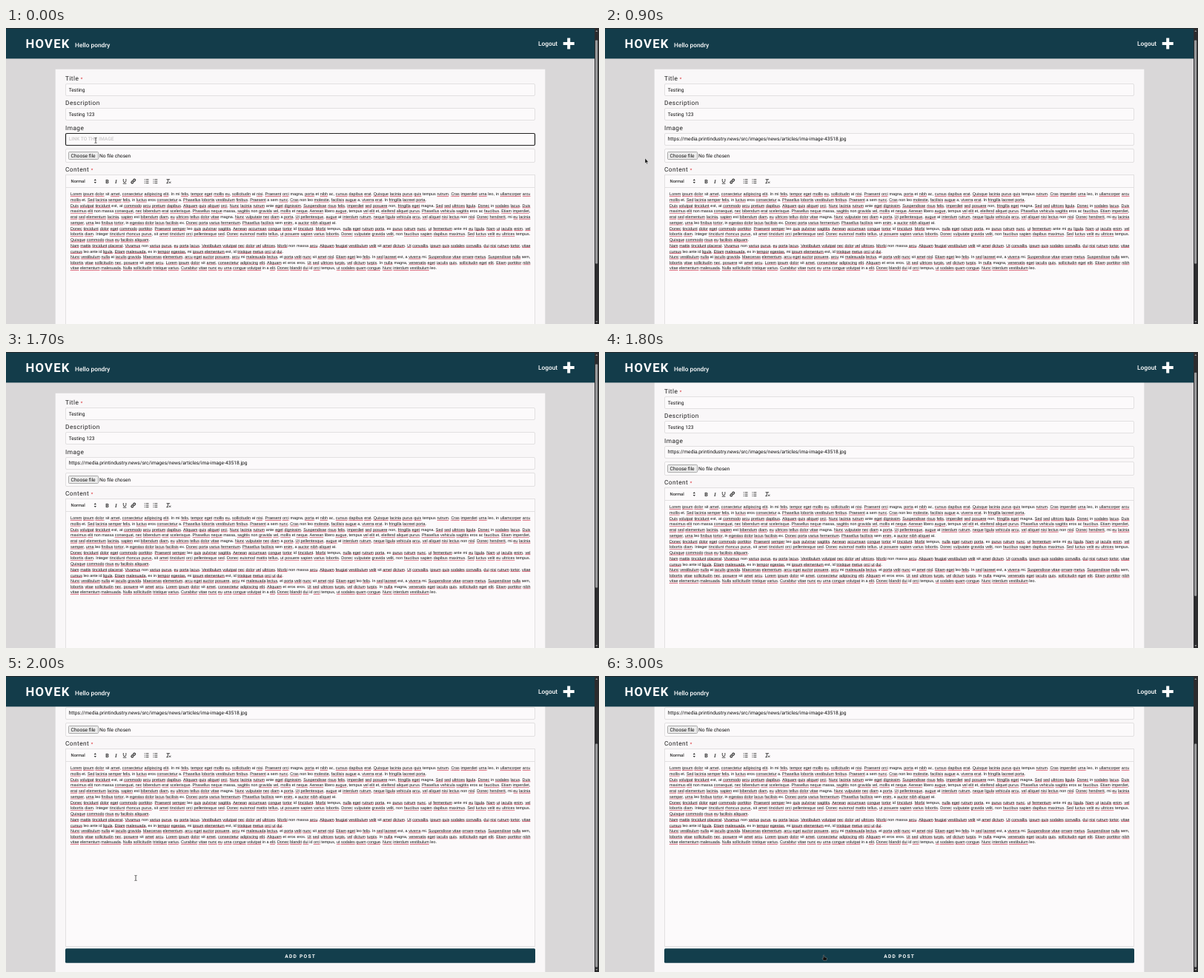
These frames come from a looping animation (800 px wide and 400 px high, 3100 ms). An HTML page:

```html
<!DOCTYPE html>
<html lang="en">
<head>
<meta charset="utf-8">
<title>Add post</title>
<style>
html, body { margin: 0; width: 100%; height: 100%; overflow: hidden; }
body { background: #d9d7d8; font-family: Roboto, sans-serif; text-rendering: geometricPrecision; }
#stage { position: relative; width: 800px; height: 400px; overflow: hidden; }
svg, #page, #copy { position: absolute; left: 0; top: 0; }
svg text { white-space: pre; }
/* The editor text is laid out at full size and shown at 800 / 1920. */
#copy { left: 86.5px; top: 221px; width: 1489px; color: #111; font: 13px/18.46px "Liberation Sans", Arial, sans-serif; transform: scale(.41667); transform-origin: 0 0; }
#copy div { height: 18.46px; white-space: nowrap; }
#copy .full { text-align: justify; text-align-last: justify; }
#copy span { padding-bottom: 1px; background: repeating-linear-gradient(90deg, #cf4a60 0 2.4px, #e59aa6 2.4px 4.8px) 0 100% / 100% 2.6px no-repeat; }
.label { font-size: 8.333px; letter-spacing: .417px; fill: #222; }
.value { font-size: 6.667px; fill: #111; }
.star { fill: #d8262c; font-size: 6px; }
.box { fill: #fcfafb; stroke: #e2e0e1; }
.icon { fill: none; stroke: #333; stroke-width: .9; }
.bold { font-weight: 700; }
.mid { font-weight: 500; }
</style>
</head>
<body>
<div id="stage">
  <div id="page">
    <svg width="800" height="520">
      <rect x="66.7" y="55.8" width="660.6" height="464" fill="#f9f7f8"/>
      <g class="label">
        <text x="80" y="71.2">Title <tspan class="star">*</tspan></text>
        <text x="80" y="104.4">Description</text>
        <text x="80" y="137.7">Image</text>
        <text x="80" y="194.3">Content <tspan class="star">*</tspan></text>
      </g>
      <g class="box">
        <rect x="80.5" y="75.5" width="633" height="16" rx="1.5"/>
        <rect x="80.5" y="108.5" width="633" height="16" rx="1.5"/>
        <rect id="link" x="80.5" y="142.5" width="633" height="16" rx="1.5"/>
        <rect x="80.5" y="163.5" width="633" height="18" rx="1.5"/>
        <rect x="80.5" y="198.5" width="633" height="267"/>
        <path d="M80 215.5H714"/>
      </g>
      <g class="value">
        <text x="84.7" y="86">Testing</text>
        <text x="84.7" y="119.2">Testing 123</text>
        <text id="hint" class="bold" x="84.7" y="152.4" fill="#d0cecf">LINK TO THE IMAGE</text>
        <text id="url" x="84.7" y="152.4">https://media.printindustry.news/src/images/news/articles/ima-image-43518.jpg</text>
        <rect x="84.5" y="167.5" width="40" height="10" rx="1" fill="#ececec" stroke="#8a8a8a" stroke-width=".7"/>
        <text x="87.6" y="174.8">Choose file</text>
        <text x="126" y="174.8">No file chosen</text>
      </g>
      <g fill="#333" font-size="5.833">
        <text class="mid" x="87.5" y="209.2">Normal</text>
        <path d="M118.7 206.3l1.6-2.2 1.6 2.2zM118.7 207.9l1.6 2.2 1.6-2.2z"/>
        <text class="bold" x="134.2" y="209.8" font-size="7.2">B</text>
        <text class="bold" x="147" y="209.8" font-size="7.2" font-style="italic" font-family="Liberation Serif, serif">I</text>
      </g>
      <g class="icon">
        <path d="M158.3 204v2.6q0 2 1.8 2t1.8-2V204M157.8 210.2h4.6"/>
        <path stroke-width="1.2" d="M170.9 207.9l1.6-1.7M170.8 206.1l-1.5 1.5a1.3 1.3 0 0 0 1.9 1.9l1.1-1.1M171.2 205.7l1.1-1.2a1.3 1.3 0 0 1 1.9 1.9l-1.5 1.5"/>
        <path d="M188.7 204.8h3.8m-3.8 2.4h3.8m-3.8 2.4h3.8M186.7 204.8h1m-1 2.4h1m-1 2.4h1"/>
        <path d="M200.5 204.8h3.8m-3.8 2.4h3.8m-3.8 2.4h3.8M198.5 204.8h1m-1 2.4h1m-1 2.4h1"/>
        <path d="M216.5 204.7h4.6M218.8 204.7l-1 4.8M216.3 209.6h2.6M220 207.6l2.2 2.2m0-2.2l-2.2 2.2"/>
      </g>
      <rect x="80" y="468.3" width="634" height="19.4" rx="1.5" fill="#133e4c"/>
      <text class="bold" x="376.2" y="480.7" font-size="6.667" letter-spacing="1.25" fill="#fff">ADD POST</text>
    </svg>
    <div id="copy"></div>
  </div>
  <svg width="800" height="400">
    <rect width="795" height="41.4" fill="#133c4a"/>
    <rect width="795" height="1" fill="#252b2e"/>
    <g fill="#fff">
      <text class="bold" x="26.5" y="26.7" font-size="16.667" letter-spacing="1.25">HOVEK</text>
      <text class="mid" x="93" y="26" font-size="8.333">Hello pondry</text>
      <text class="mid" x="718" y="23.9" font-size="8.333">Logout</text>
      <path d="M757.2 13.5h4v5.5h5.5v4h-5.5v5.5h-4v-5.5h-5.5v-4h5.5z"/>
    </g>
    <rect x="794" width="6" height="400" fill="#2c2c2e"/>
    <path d="M795.3 5l1.5-2 1.5 2zM795.3 396l1.5 2 1.5-2z" fill="#999"/>
    <rect id="thumb" x="795" width="3.2" height="302" rx="1" fill="#9b9b9d"/>
    <g id="cursor">
      <path id="beam" d="M-1.5-3.5Q0-3.5 0-2.8Q0-3.5 1.5-3.5M0-2.8V2.8M-1.5 3.5Q0 3.5 0 2.8Q0 3.5 1.5 3.5" fill="none" stroke="#333" stroke-width=".8"/>
      <path id="arrow" d="M0 0V7L1.5 5.6 2.5 8 3.5 7.5 2.6 5.2H4.6z" fill="#111" stroke="#fff" stroke-width=".4"/>
      <path id="hand" d="M-1.6-3.6q.8-.8 1.4 0V-1.2l2.8.7q1 .3.9 1.3L2.8 3.4H-1.2L-3 .7q0-1 1.4-.1z" fill="#111" stroke="#ddd" stroke-width=".3"/>
    </g>
  </svg>
</div>
<script>
const LOOP = 3100, STEP = 100;
const $ = id => document.getElementById(id);

const copy = `Lorem ipsum dolor sit amet, consectetur adipiscing elit. In mi felis, tempor eget mollis eu, sollicitudin at nisi. Praesent orci magna, porta et nibh ac, cursus dapibus erat. Quisque lacinia purus quis tempus rutrum. Cras imperdiet urna leo, in ullamcorper arcu
mollis et. Sed lacinia semper felis, in luctus eros consectetur a. Phasellus lobortis vestibulum finibus. Praesent a sem nunc. Cras non leo molestie, facilisis augue a, viverra erat. In fringilla laoreet porta.
Duis volutpat tincidunt est, at commodo arcu pretium dapibus. Aliquam quis aliquet orci. Nunc lacinia rutrum ante eget dignissim. Suspendisse risus felis, imperdiet sed posuere non, fringilla eget magna. Sed sed ultrices ligula. Donec in sodales lacus. Duis
maximus elit non massa consequat, nec bibendum erat scelerisque. Phasellus neque massa, sagittis non gravida vel, mollis et neque. Aenean libero augue, tempus vel elit et, eleifend aliquet purus. Phasellus vehicula sagittis eros ac faucibus. Etiam imperdiet,
erat sed elementum lacinia, sapien est bibendum diam, eu ultrices tellus dolor vitae magna. Nunc vulputate nec diam a porta. Ut pellentesque, augue at interdum rutrum, neque ligula vehicula arcu, vel aliquet nisi lectus non nisl. Donec hendrerit, mi eu lacinia
semper, urna leo finibus tortor, in egestas dolor lacus facilisis ex. Donec porta varius fermentum. Phasellus facilisis sem enim, a auctor nibh aliquet at.
Donec tincidunt dolor eget commodo porttitor. Praesent semper leo quis pulvinar sagittis. Aenean accumsan congue tortor id tincidunt. Morbi tempus, nulla eget rutrum porta, ex purus rutrum nunc, ut fermentum ante mi eu ligula. Nam ut iaculis enim, vel
lobortis diam. Integer tincidunt rhoncus purus, sit amet tincidunt orci pellentesque sed. Donec euismod mattis tellus, ut posuere sapien varius lobortis. Donec vulputate gravida velit, non faucibus sapien dapibus maximus. Sed luctus velit eu ultrices tempus.
Quisque commodo risus eu facilisis aliquam.
Nam mattis tincidunt placerat. Vivamus non varius purus, eu porta lacus. Vestibulum volutpat nec dolor vel ultrices. Morbi non massa arcu. Aliquam feugiat vestibulum velit sit amet dictum. Ut convallis, ipsum quis sodales convallis, dui nisi rutrum tortor, vitae
cursus leo ante id ligula. Etiam malesuada, ex in tempor egestas, mi ipsum elementum est, id tristique metus orci ut dui.
Nunc vestibulum nulla at iaculis gravida. Maecenas elementum, arcu eget auctor posuere, arcu mi malesuada lectus, et porta velit nunc sit amet nisl. Etiam eget leo felis. In sed laoreet est, a viverra mi. Suspendisse vitae ornare metus. Suspendisse nulla sem,
lobortis vitae sollicitudin nec, posuere sit amet arcu. Lorem ipsum dolor sit amet, consectetur adipiscing elit. Aliquam et eros eros. Ut sed ultrices turpis, vel dictum turpis. In nulla magna, venenatis eget iaculis quis, sollicitudin eget elit. Etiam porttitor nibh
vitae elementum malesuada. Nulla sollicitudin tristique varius. Curabitur vitae nunc eu urna congue volutpat in a elit. Donec blandit dui id orci tempus, ut sodales quam congue. Nunc interdum vestibulum leo.`;

// Words the spell checker accepts stay without an underline.
const known = /^(a|in|at|id|sit|mi|et|ac|ex|non|est|leo|sem|ante|magna|eros|integer|massa|libero|tempus)$/i;
$('copy').innerHTML = copy.split('\n').map(line =>
  `<div class="${line.length > 230 ? 'full' : ''}">` +
  line.replace(/\w+/g, w => known.test(w) ? w : `<span>${w}</span>`) + '</div>').join('');

// Keys are [time, value, ...]; values run straight between them.
const scrollKeys = [[1700, 0], [1800, 15], [1900, 45.5], [2000, 100]];
const moves = [
  { shape: 'beam', from: 0, to: 400, keys: [[200, 121, 152], [400, 100, 158]] },
  { shape: 'arrow', from: 400, to: 1500, keys: [[300, 110, 153], [800, 54, 176]] },
  { shape: 'beam', from: 2000, to: 2900, keys: [[2000, 175, 273], [2500, 261, 313], [2600, 261, 313], [2900, 288, 361]] },
  { shape: 'hand', from: 2900, to: LOOP, keys: [[2900, 290, 371], [3000, 296, 381]] }
];

function track(keys, t) {
  const next = keys.findIndex(k => k[0] > t);
  if (next < 0) return keys[keys.length - 1].slice(1);
  if (next === 0) return keys[0].slice(1);
  const a = keys[next - 1], b = keys[next], p = (t - a[0]) / (b[0] - a[0]);
  return a.slice(1).map((v, i) => v + (b[i + 1] - v) * p);
}

const show = (id, on) => { $(id).style.display = on ? '' : 'none'; };

function draw(t) {
  const [scroll] = track(scrollKeys, t);
  $('page').style.transform = `translateY(${-scroll}px)`;
  $('thumb').setAttribute('y', 16.5 + scroll * .75);

  show('hint', t < 100);
  show('url', t >= 100);
  const focused = t < 800;
  $('link').style.stroke = focused ? '#222' : '';
  $('link').style.strokeWidth = focused ? 1.2 : '';

  const move = moves.find(m => t >= m.from && t < m.to);
  for (const id of ['beam', 'arrow', 'hand']) show(id, move && move.shape === id);
  if (move) $('cursor').setAttribute('transform', `translate(${track(move.keys, t)})`);
}

const start = performance.now();
function tick() {
  const t = (performance.now() - start) % LOOP;
  draw(Math.floor(t / STEP) * STEP);
  requestAnimationFrame(tick);
}
tick();
</script>
</body>
</html>
```
